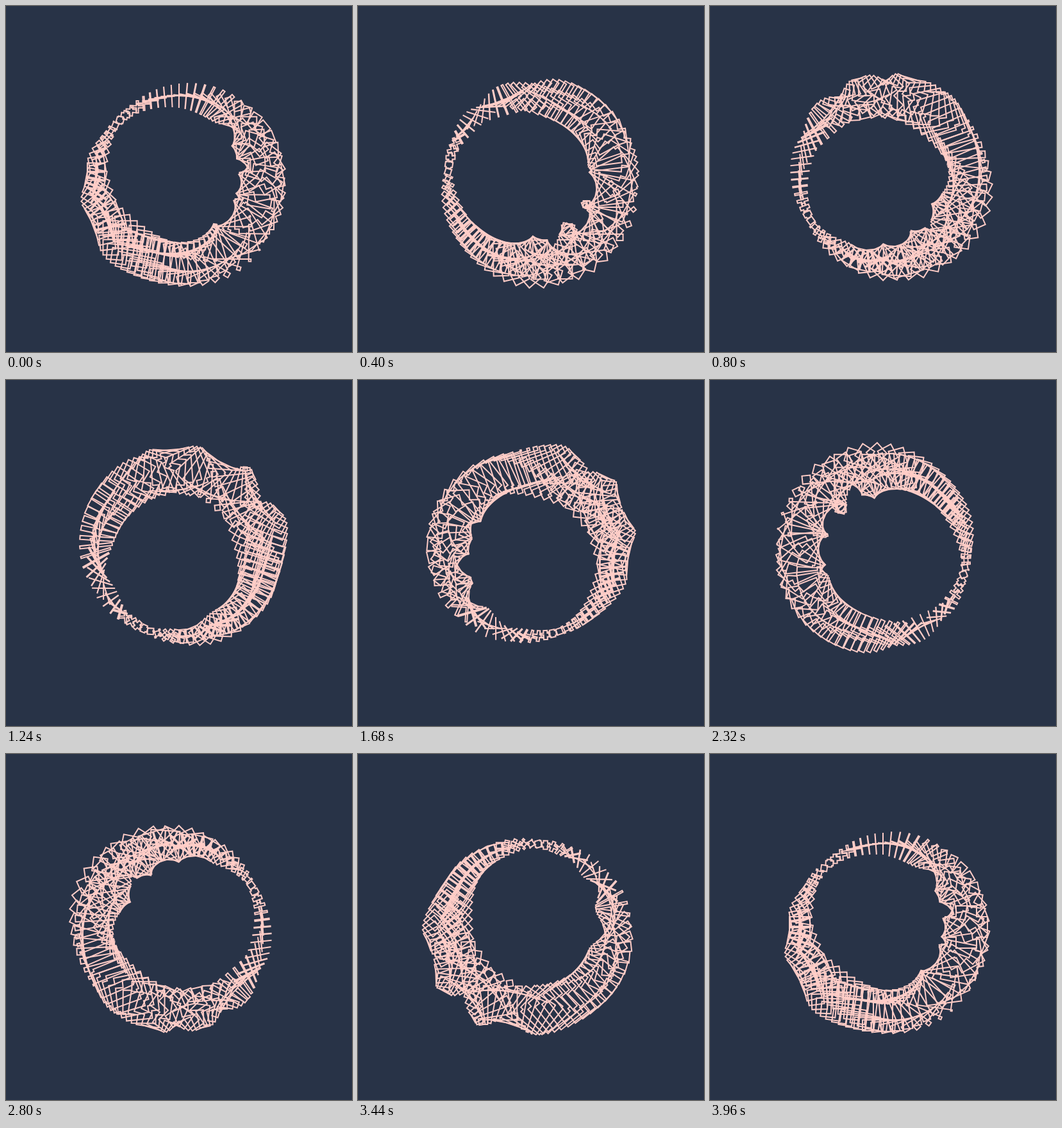
Animation of 540 by 540 pixels, one loop 4000 ms. Source, as an HTML page with a canvas:

```html
<!DOCTYPE html>
<html lang="en">
<head>
<meta charset="utf-8">
<title>Spirolateral ring</title>
<style>
  html, body { margin: 0; width: 100%; height: 100%; overflow: hidden; background: #283347; }
  canvas { display: block; width: 540px; height: 540px; }
</style>
</head>
<body>
<canvas width="540" height="540"></canvas>
<script>
const ctx = document.querySelector('canvas').getContext('2d');
const TAU = Math.PI * 2;
const LOOP = 4000, STEPS = 100;
const COUNT = 72, RADIUS = 130, CENTER = 270;
const SIDE = 32, NOTCH = 24;

// Square whose corners carry small squares: loops outside when notch > 0, cuts inside when notch < 0.
function notchedSquare(side, notch) {
  const half = side / 2, line = half - notch;
  let corners = [[-half, line], [half, line], [half, half]];
  ctx.beginPath();
  for (let k = 0; k < 4; k++) {
    for (const [x, y] of corners) ctx.lineTo(x, -y);
    corners = corners.map(([x, y]) => [y, -x]);
  }
  ctx.closePath();
}

function draw(turn) {
  ctx.setTransform(1, 0, 0, 1, 0, 0);
  ctx.fillStyle = '#283347';
  ctx.fillRect(0, 0, 540, 540);
  ctx.strokeStyle = '#ffcdc7';
  ctx.lineWidth = 2;
  for (let i = 0; i < COUNT; i++) {
    const theta = i * TAU / COUNT;
    const wave = theta - turn;
    ctx.setTransform(1, 0, 0, 1, CENTER, CENTER);
    ctx.rotate(-theta);
    ctx.translate(RADIUS, 0);
    ctx.rotate(-Math.PI * Math.sin(theta + turn));
    notchedSquare(SIDE * (1 - Math.sin(wave)), -NOTCH * Math.sin(wave + TAU / 8));
    ctx.stroke();
  }
}

function tick() {
  const step = Math.floor(performance.now() % LOOP / LOOP * STEPS);
  draw((step + 1) / STEPS * TAU);
  requestAnimationFrame(tick);
}
tick();
</script>
</body>
</html>
```
